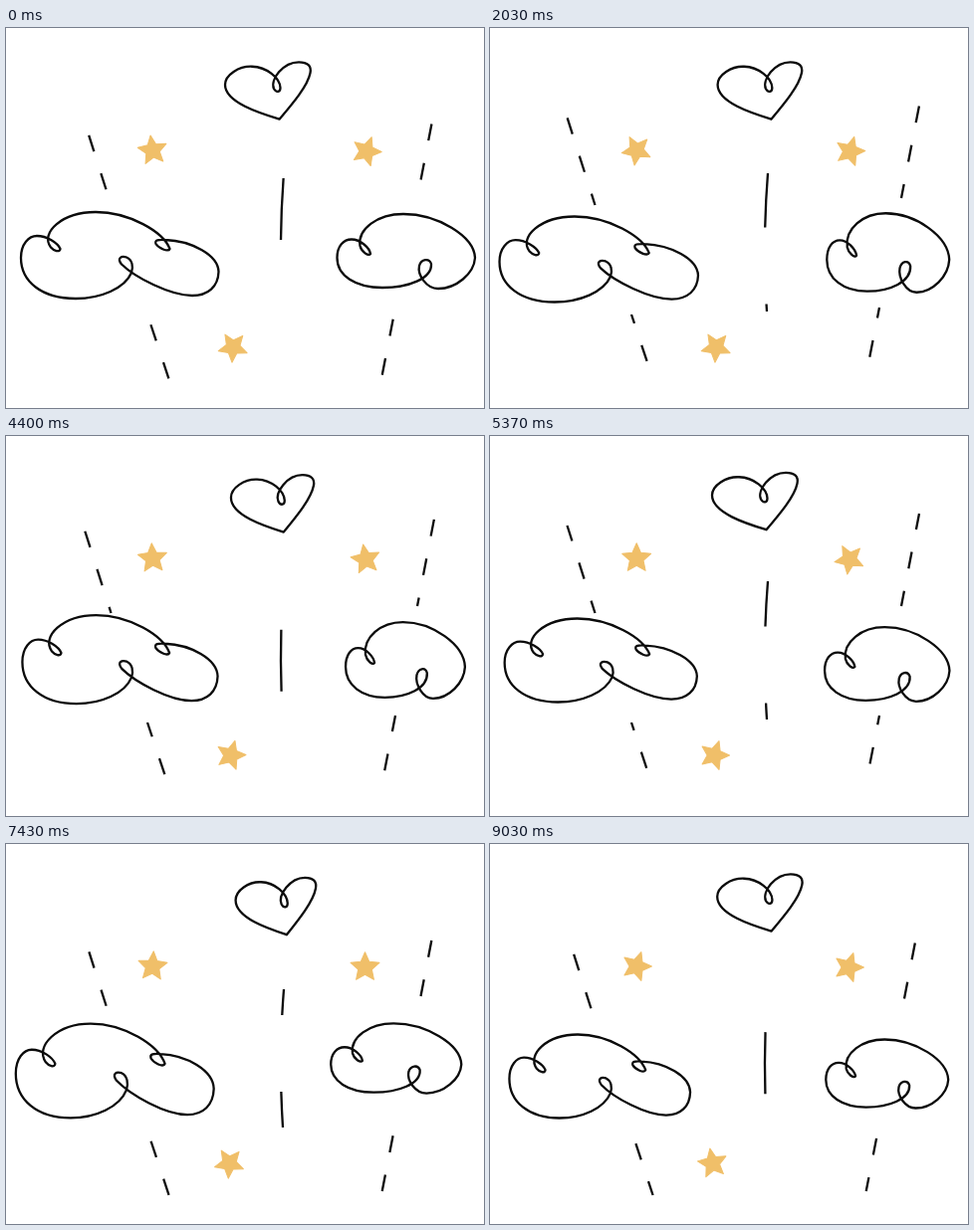
An HTML page that plays this animation: 480x382 px, repeating every 9.06 s.

```html
<!DOCTYPE html>
<html lang="en">
<head>
<meta charset="utf-8">
<title>Clouds, heart and stars</title>
<style>
  html, body { margin: 0; width: 100%; height: 100%; overflow: hidden; background: #fff; }
  svg { display: block; width: 100%; height: 100%; }
  .ink path { fill: none; stroke: #0b0b0b; stroke-width: 2.3; stroke-linejoin: round; vector-effect: non-scaling-stroke; }
  .dash { stroke-dasharray: 17 23; }
  #bar { stroke-dasharray: 62 77; }
  .star { fill: #f0bf69; stroke: #f0bf69; stroke-width: 1; stroke-linejoin: round; }
</style>
</head>
<body>
<svg viewBox="0 0 480 382">
  <g class="ink">
    <path class="dash" data-skip="0" d="M77.5 90 L105.5 178"/>
    <path class="dash" data-skip="208" d="M142 288 L163.6 353"/>
    <path class="dash" data-skip="0" d="M431 78 L413 171"/>
    <path class="dash" data-skip="206.8" d="M391 281 L377.7 349"/>
    <path id="bar" pathLength="139" d="M279 146 Q273.5 215 278 285"/>
    <path id="heart" d="M274.5 92 C255 86 220 75 220 57 C220 47 234 38 247 38.5 C262 39 275 50 275.5 60 C275.5 64.5 271.5 65.5 269 61 C265 52 278 34 294 34 C303 34 307 38 305.5 45 C303 58 288 76 274.5 92Z"/>
    <path id="wide" d="M15 231 C15 217 23 209 31 209 C41 209 52 216 54.5 222 C54 226 48 224 45 220.5 C34 206 56 185 90 185 C124 185 158 205 164.5 222 C163 226 153 221 150.5 217 C149 213 153 212.5 160 213 C186 214 213 228 213.5 245 C213 260 203 269 187 269 C165 269 130 251 116 237.5 C111 231 116 229 121 230.5 C127 233 128 240 126 246 C119 262 95 272 70 272 C36 272 15 255 15 231Z"/>
    <path id="small" d="M332.5 231 C332.5 219 339 212.5 347 212.5 C356 212.5 365 221 366 227 C364 230 357 225 355.5 219 C353 202 373 187 399 187 C433 187 470 209 471 231 C470 247 452 262 434 262 C422 262 413 248 415 239 C417 232 425 231 427 237 C428 252 404 261 378 261 C351 261 332.5 249 332.5 231Z"/>
  </g>
</svg>
<script>
const LOOP = 9060, FPS = 30;
const svg = document.querySelector("svg");

// Seconds of the key poses that all drifts and turns share
const times = [0, 2.03, 3.43, 5.37, 6.63, 7.43, 9.03];

// Slow breathing of a size: starts at 1, then swings around 1 + mean
const breathe = (mean, amp, peak, period) => t =>
  1 + Math.min(1, t / 2) * (mean + amp * Math.cos(2 * Math.PI * (t - peak) / period));

const doodles = [
  { id: "heart", x: [0, 8, 6, 3, -1, 8, 8], y: [0, 0, 5, 2.5, -7, -0.5, -4],
    w: breathe(-0.03, 0.03, 5.4, 4), h: () => 0.99 },
  { id: "wide", x: [0, -5, 2.5, -3, -2, -5, -4], y: [0, 4, -3, -3, 1.5, -0.5, 5],
    w: breathe(-0.04, 0.045, 7.6, 2.8), h: breathe(0.03, 0.065, 7.2, 3.8) },
  { id: "small", x: [0, -2, 1, -3, -3, -10, -3], y: [0, 1.5, -3, 5, 1, -9, 6.5],
    w: breathe(-0.1, 0.05, 7, 7), h: breathe(-0.01, 0.07, 2, 14) }
];

const stars = [
  { x: 147.2, y: 123, slide: 0, turn: [-8, -28, -8, 0, 16, 4, 18] },
  { x: 362, y: 124, slide: -0.2, turn: [20, 16, 16, -28, 18, 0, 18] },
  { x: 228, y: 321, slide: -0.5, turn: [-32, -32, 8, 18, 18, -32, -10] }
];

// Smooth curve through one value per key time
function glide(values, t) {
  const last = times.length - 1;
  let i = 0;
  while (i < last - 1 && t >= times[i + 1]) i++;
  const span = times[i + 1] - times[i], u = Math.min((t - times[i]) / span, 1);
  const slope = k => {
    const a = Math.max(k - 1, 0), b = Math.min(k + 1, last);
    return (values[b] - values[a]) / (times[b] - times[a]) * span;
  };
  const m0 = slope(i), m1 = slope(i + 1), d = values[i + 1] - values[i];
  return values[i] + u * (m0 + u * (3 * d - 2 * m0 - m1 + u * (m0 + m1 - 2 * d)));
}

function starPath(outer, inner) {
  const points = Array.from({ length: 10 }, (_, i) => {
    const r = i % 2 ? inner : outer, a = (i * 36 - 90) * Math.PI / 180;
    return (r * Math.cos(a)).toFixed(2) + " " + (r * Math.sin(a)).toFixed(2);
  });
  return "M" + points.join("L") + "Z";
}

for (const s of stars) {
  s.el = document.createElementNS("http://www.w3.org/2000/svg", "path");
  s.el.setAttribute("class", "star");
  s.el.setAttribute("d", starPath(15.2, 7.2));
  svg.append(s.el);
}
for (const d of doodles) {
  d.el = document.getElementById(d.id);
  const box = d.el.getBBox();
  d.cx = box.x + box.width / 2;
  d.cy = box.y + box.height / 2;
}
const dashes = document.querySelectorAll(".dash");
const bar = document.getElementById("bar");

function draw(t) {
  const dashStart = 18.8 - 48.36 * t;
  for (const d of dashes) d.style.strokeDashoffset = d.dataset.skip - dashStart;
  bar.style.strokeDashoffset = (211.2 * t - 5) % 139;

  for (const d of doodles) {
    const x = d.cx + glide(d.x, t), y = d.cy + glide(d.y, t);
    d.el.setAttribute("transform",
      `translate(${x} ${y}) scale(${d.w(t)} ${d.h(t)}) translate(${-d.cx} ${-d.cy})`);
  }
  for (const s of stars) {
    s.el.setAttribute("transform",
      `translate(${s.x + s.slide * t} ${s.y}) rotate(${glide(s.turn, t)})`);
  }
}

const start = performance.now();
function tick() {
  const ms = (performance.now() - start) % LOOP;
  draw(Math.floor(ms * FPS / 1000 + 0.11) / FPS);
  requestAnimationFrame(tick);
}
draw(0);
requestAnimationFrame(tick);
</script>
</body>
</html>
```
